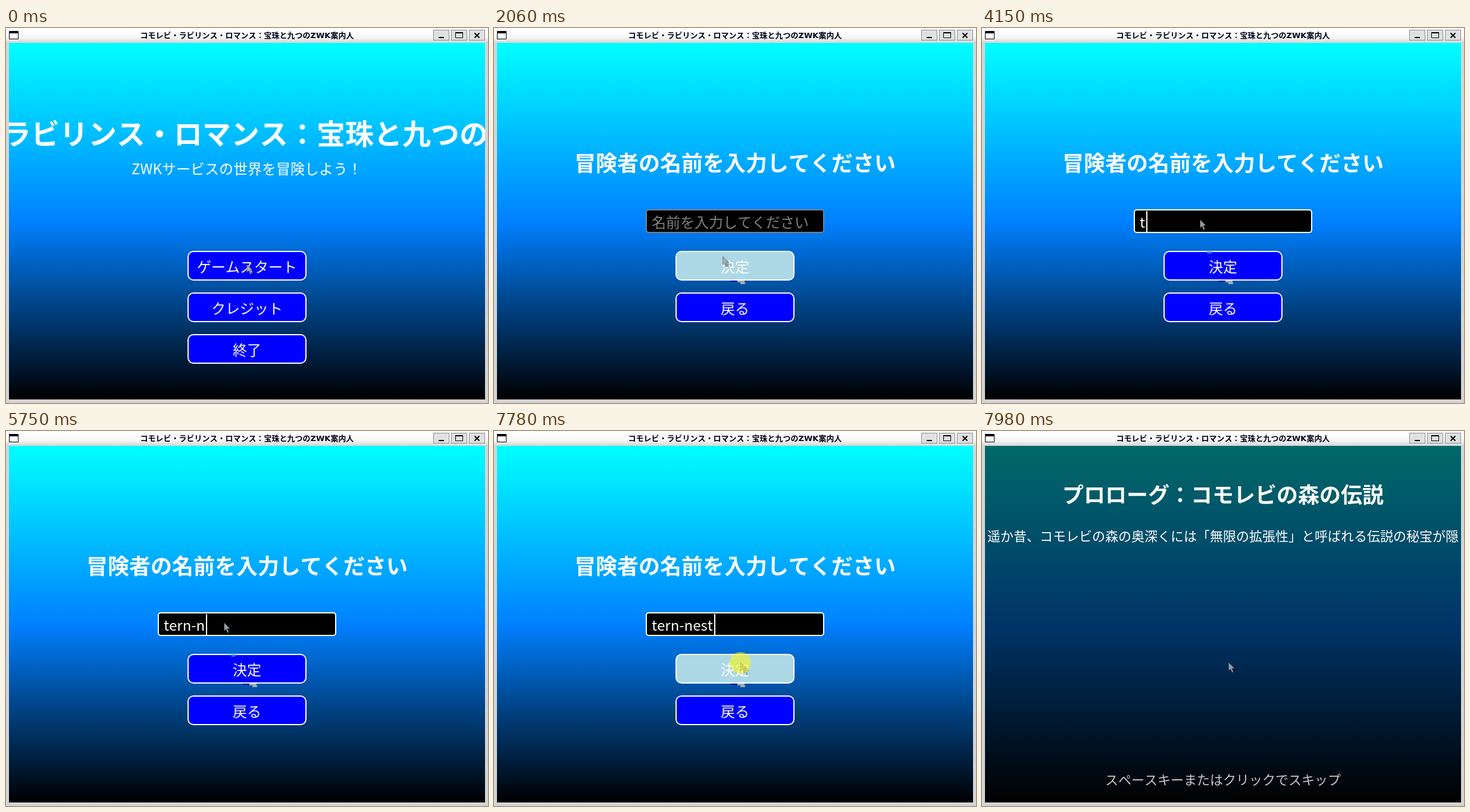
Recreate the animation shown at these times as an HTML page with a canvas. Size 810x631 px, loop 8 s.

```html
<!DOCTYPE html>
<html lang="ja">
<head>
<meta charset="utf-8">
<title>コモレビ・ラビリンス・ロマンス</title>
<style>
html, body { margin: 0; width: 100%; height: 100%; overflow: hidden; background: #d4d4d4; }
canvas { display: block; }
</style>
</head>
<body>
<canvas id="stage" width="810" height="631"></canvas>
<script>
const ctx = document.getElementById('stage').getContext('2d');
const LOOP = 8000;
const CJK = '"Noto Sans CJK JP", "Noto Sans CJK", sans-serif';
const GAME_TITLE = 'コモレビ・ラビリンス・ロマンス：宝珠と九つのZWK案内人';
const PLAYER = 'tern-nest';
const KEY_TIMES = [4150, 4290, 4430, 4560, 5420, 5750, 5950, 6090, 6220];
const NAME_SCREEN = 1270, FIRST_MOVE = 2060, FOCUS = 2730, PROLOGUE = 7840;
const CLICKS = [[1200, 1340], [2660, 2800], [7780, 7910]];

const easeOut = p => 1 - (1 - p) ** 2;
const easeInOut = p => p * p * (3 - 2 * p);

// Pointer moves: start, end, from, to, easing
const MOVES = [
  [0, 280, [404, 397], [405, 408], easeInOut],
  [FIRST_MOVE, 2560, [384, 384], [366, 322], easeOut],
  [7050, 7520, [366, 322], [414, 389], easeInOut]
];

function pointerAt(t) {
  const [start, end, from, to, ease] = MOVES.findLast(move => t >= move[0]);
  const p = ease(Math.min(1, (t - start) / (end - start)));
  return from.map((v, i) => Math.round(v + (to[i] - v) * p));
}

function rect(x, y, w, h, color) {
  ctx.fillStyle = color;
  ctx.fillRect(x, y, w, h);
}

function gradient(y0, y1, ...colors) {
  const g = ctx.createLinearGradient(0, y0, 0, y1);
  colors.forEach((c, i) => g.addColorStop(i / (colors.length - 1), c));
  return g;
}

function text(str, x, y, size, { color = '#fff', weight = 400, align = 'center', font = CJK } = {}) {
  ctx.font = `${weight} ${size}px ${font}`;
  ctx.fontKerning = 'none';
  ctx.textAlign = align;
  ctx.fillStyle = color;
  ctx.fillText(str, x, y);
}

function roundBox(x, y, w, h, r, fill, stroke) {
  ctx.beginPath();
  ctx.roundRect(x + 1, y + 1, w - 2, h - 2, r - 1);
  ctx.fillStyle = fill;
  ctx.fill();
  ctx.strokeStyle = stroke;
  ctx.lineWidth = 2;
  ctx.stroke();
}

function button(label, y, hover) {
  roundBox(305, y, 200, 50, 10, hover ? '#add8e6' : '#00f', '#fff');
  text(label, 405, y + 36, 24);
}

function windowFrame() {
  rect(0, 0, 810, 631, '#d4d4d4');
  rect(0, 0, 810, 25, gradient(0, 25, '#fff', '#fdfdfd', '#f4f4f4', '#d4d4d4'));
  rect(5, 5, 16, 14, '#000');
  rect(6, 9, 14, 9, '#fff');
  text(GAME_TITLE, 405, 17, 13, { color: '#000018', weight: 700, font: '"DejaVu Sans", ' + CJK });
  for (const x of [718, 748, 778]) {
    rect(x, 3, 27, 18, '#8c8c8c');
    rect(x + 1, 4, 25, 16, '#dfe0e2');
  }
  rect(727, 15, 9, 2, '#000');
  rect(755, 7, 13, 10, '#000');
  rect(756, 9, 11, 7, '#dfe0e2');
  ctx.beginPath();
  ctx.moveTo(787.5, 8.5); ctx.lineTo(795.5, 16.5);
  ctx.moveTo(795.5, 8.5); ctx.lineTo(787.5, 16.5);
  ctx.strokeStyle = '#000';
  ctx.lineWidth = 2;
  ctx.stroke();
}

function menuScreen() {
  text(GAME_TITLE, -246, 196, 48, { weight: 700, align: 'left' });
  text('ZWKサービスの世界を冒険しよう！', 598, 246, 24, { align: 'right' });
  button('ゲームスタート', 375);
  button('クレジット', 445);
  button('終了', 515);
}

function nameScreen(t, [px, py]) {
  text('冒険者の名前を入力してください', 405, 241, 36, { weight: 700 });
  roundBox(255, 305, 300, 40, 5, '#000', t >= FOCUS ? '#fff' : '#808080');
  const typed = PLAYER.slice(0, KEY_TIMES.filter(k => t >= k).length);
  if (typed) {
    text(typed, 265, 336, 24, { align: 'left' });
    const caretOn = (t - 3740) % 1005 < 535;
    if (caretOn) rect(267 + Math.round(ctx.measureText(typed).width), 308, 2, 35, '#fff');
  } else {
    text('名前を入力してください', 265, 336, 24, { color: '#808080', align: 'left' });
  }
  const hover = px >= 305 && px < 505 && py >= 375 && py < 425;
  button('決定', 375, hover);
  button('戻る', 445);
  if (t >= FIRST_MOVE) pointerTrail(!hover);
}

// Specks the pointer leaves behind
function pointerTrail(onButton) {
  rect(398, 425, 11, 2, '#0000b0');
  rect(409, 425, 12, 3, '#a0adb4');
  rect(414, 428, 8, 3, '#a0adb4');
  if (onButton) {
    rect(378, 376, 8, 3, '#2a86d8');
    rect(379, 379, 6, 1, '#1450e0');
  }
}

function prologueScreen() {
  rect(5, 25, 800, 600, 'rgba(0,0,0,.588)');
  text('プロローグ：コモレビの森の伝説', 405, 121, 36, { weight: 700 });
  text('遥か昔、コモレビの森の奥深くには「無限の拡張性」と呼ばれる伝説の秘宝が隠', 405, 185, 22);
  text('スペースキーまたはクリックでスキップ', 405, 595, 22, { color: '#c8c8c8' });
}

function arrowPath(x, y) {
  const points = [[0, 0], [0, 14], [3, 11], [6, 17], [8, 16], [5.5, 10], [10, 10]];
  ctx.beginPath();
  for (const [dx, dy] of points) ctx.lineTo(x + dx, y + dy);
  ctx.closePath();
}

function pointer([x, y], clicking) {
  arrowPath(x + 5, y + 5);
  ctx.fillStyle = 'rgba(0,0,0,.22)';
  ctx.fill();
  arrowPath(x + .5, y + .5);
  ctx.fillStyle = 'rgba(165,172,176,.9)';
  ctx.fill();
  ctx.strokeStyle = 'rgba(30,40,50,.45)';
  ctx.lineWidth = 1;
  ctx.stroke();
  if (!clicking) return;
  ctx.beginPath();
  ctx.arc(x, y + 1, 18, 0, Math.PI * 2);
  ctx.fillStyle = 'rgba(255,250,0,.53)';
  ctx.fill();
}

function draw(t) {
  const position = pointerAt(t);
  windowFrame();
  ctx.save();
  ctx.beginPath();
  ctx.rect(5, 25, 800, 600);
  ctx.clip();
  rect(5, 25, 800, 600, gradient(25, 625, '#0ff', '#0080ff', '#000'));
  if (t < NAME_SCREEN) menuScreen();
  else if (t < PROLOGUE) nameScreen(t, position);
  else prologueScreen();
  pointer(position, CLICKS.some(([from, to]) => t >= from && t < to));
  ctx.restore();
}

const start = performance.now();
function tick() {
  draw((performance.now() - start) % LOOP);
  requestAnimationFrame(tick);
}
tick();
</script>
</body>
</html>
```
